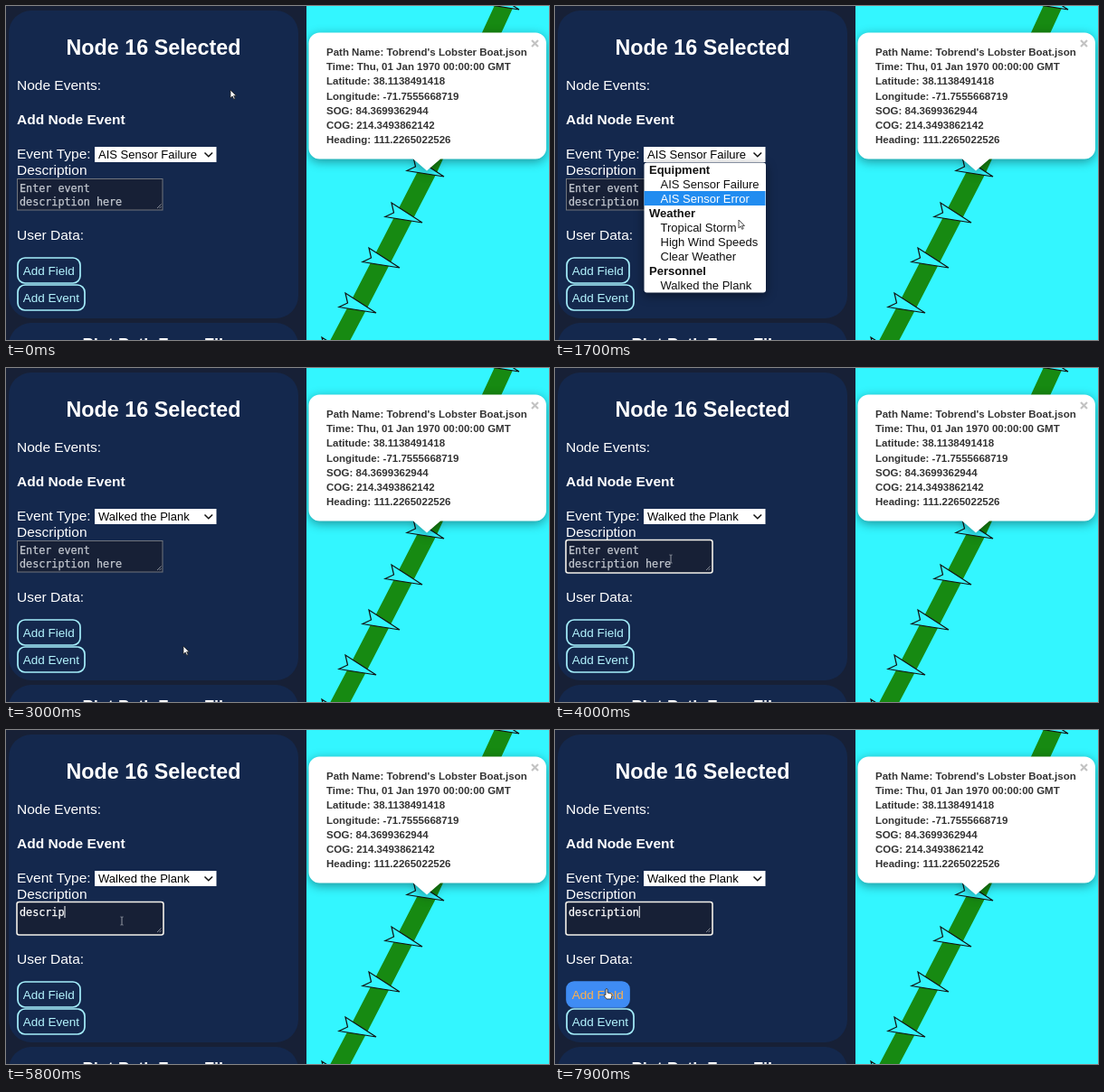
Animation, 600 px wide and 370 px high, one loop 8 s. Source, as an HTML page:

```html
<!DOCTYPE html>
<html lang="en">
<head>
<meta charset="utf-8">
<title>Add node event</title>
<style>
html, body { margin: 0; width: 100%; height: 100%; overflow: hidden; background: #172036; }
svg { display: block; width: 600px; height: 370px; font: 15.5px "Liberation Sans", Arial, sans-serif; }
text { white-space: pre; }
.h { font-weight: bold; }
.field { font-size: 13px; }
.mono { font: 11.75px "DejaVu Sans Mono", monospace; stroke-width: .25; }
.btn { font-size: 13.5px; fill: #b4f5ff; }
.btn rect { fill: none; stroke: #a5effc; stroke-width: 1.7; }
.hover, .hover text { fill: #ffb04a; }
.hover rect { fill: #3f8cf4; stroke: #3f8cf4; }
.info { font-size: 11.5px; font-weight: bold; fill: #333; }
.popup { fill: #fff; filter: drop-shadow(0 3px 6px rgba(0,0,0,.4)); }
.list { filter: drop-shadow(0 3px 6px rgba(0,0,0,.45)); }
</style>
</head>
<body>
<svg viewBox="0 0 600 370">
  <g fill="#14284d">
    <rect x="3" y="5" width="320" height="341" rx="25"/>
    <rect x="3" y="351" width="320" height="90" rx="25"/>
  </g>
  <g fill="#fff">
    <text class="h" x="163" y="54" font-size="23.3" text-anchor="middle">Node 16 Selected</text>
    <text x="12" y="93">Node Events:</text>
    <text class="h" x="12" y="131">Add Node Event</text>
    <text x="12" y="169">Event Type:</text>
    <text x="12" y="187">Description</text>
    <text x="12" y="259">User Data:</text>
    <text class="h" x="84.5" y="380.5" font-size="18.2">Plot Path From File</text>
  </g>

  <rect x="98" y="156" width="134.5" height="17" fill="#fff"/>
  <text id="choice" class="field" x="102" y="169"></text>
  <path d="M219.5 162.5l4.300 4.300 4.300-4.300" fill="none" stroke="#111" stroke-width="1.5"/>

  <rect id="area" fill="#172036"/>
  <path d="M167 224l4.500-4.500M169.500 224l2-2" stroke="#a0a4ab" stroke-width=".8"/>
  <g id="hint" class="mono" fill="#c3c8d0" stroke="#c3c8d0">
    <text x="15" y="206">Enter event</text>
    <text x="15" y="220.500">description here</text>
  </g>
  <text id="typed" class="mono" x="15" y="206" fill="#fff" stroke="#fff"></text>
  <rect id="caret" y="195" width="1" height="13" fill="#fff"/>

  <g id="addField" class="btn">
    <rect x="13" y="279" width="69" height="28" rx="8"/>
    <text x="18.800" y="297.500">Add Field</text>
  </g>
  <g class="btn">
    <rect x="13" y="309" width="74" height="28" rx="8"/>
    <text x="18.800" y="327.500">Add Event</text>
  </g>

  <g id="list" class="field">
    <rect class="list" x="98.500" y="173.500" width="134.500" height="144" rx="3" fill="#fff"/>
    <rect id="mark" x="98.500" width="134" height="16" fill="#218cf0"/>
  </g>

  <svg x="332" width="268" height="370" viewBox="332 0 268 370">
    <rect x="332" width="268" height="370" fill="#33f6ff"/>
    <path d="M554-8L466 183 391 329 360 388" fill="none" stroke="#178a12" stroke-width="19.500"/>
    <g id="boats" fill="#33f6ff" stroke="#111" stroke-width="1.2"></g>
    <path class="popup" d="M346.500 29.500h238.500a12 12 0 0 1 12 12v116a12 12 0 0 1-12 12h-105l-15 13-15-13h-103.500a12 12 0 0 1-12-12v-116a12 12 0 0 1 12-12z"/>
    <g id="info" class="info"></g>
    <path d="M581 38l7 7m0-7l-7 7" stroke="#c3c3c3" stroke-width="2.200"/>
  </svg>

  <g id="cursor">
    <path d="M0 0v9l2.200-2 1.500 3.300 1.500-.7-1.500-3.200h2.800z" fill="#fff" stroke="#222" stroke-width=".8"/>
    <path d="M-1.500-4h1l.5.500.5-.500h1M0-3.500v8M-1.500 5h1l.5-.500.5.500h1" fill="none" stroke="#a4a9b2" stroke-width=".9"/>
    <path d="M-1 0q1-1 2 0v4l4 1q1 .5 1 2l-1 4h-5l-3-4q0-1.500 2-.5z" fill="#fff" stroke="#222" stroke-width=".8"/>
  </g>
</svg>
<script>
const $ = id => document.getElementById(id);
const set = (el, attrs) => { for (const k in attrs) el.setAttribute(k, attrs[k]); };
const show = (el, on) => { el.style.display = on ? "" : "none"; };
const add = (parent, tag, attrs, text = "") => {
  const el = document.createElementNS("http://www.w3.org/2000/svg", tag);
  set(el, attrs);
  el.textContent = text;
  return parent.appendChild(el);
};

const LOOP = 8000, OPEN = 700, PICK = 2900, FOCUS = 3700, HOVER = 7300;
const TYPE_START = 5200, KEY = 100, WORD = "description", CHAR = 7.07;

for (const [x, y] of [[546, -6], [463, 179], [439, 230], [414, 280], [388, 330], [362, 379]])
  add($("boats"), "path", { d: `M${x + 21} ${y + 10}l-34-22 2.5 11-9.5 4.500z` });

["Path Name: Tobrend's Lobster Boat.json", "Time: Thu, 01 Jan 1970 00:00:00 GMT",
  "Latitude: 38.1138491418", "Longitude: -71.7555668719", "SOG: 84.3699362944",
  "COG: 214.3493862142", "Heading: 111.2265022526"]
  .forEach((line, i) => add($("info"), "text", { x: 354, y: 55 + i * 16.2 }, line));

const rows = ["Equipment", "AIS Sensor Failure", "AIS Sensor Error", "Weather", "Tropical Storm",
  "High Wind Speeds", "Clear Weather", "Personnel", "Walked the Plank"];
const isGroup = i => i === 0 || i === 3 || i === 7;
const labels = rows.map((name, i) => add($("list"), "text",
  { x: isGroup(i) ? 104 : 116.5, y: 185.7 + i * 16, class: isGroup(i) ? "h" : "" }, name));

// Pointer stops: time, x, y
const path = [[0, 248, 93], [100, 248, 93], [600, 199, 165], [1200, 199, 165], [1700, 203, 237],
  [2400, 196, 308], [3000, 196, 308], [3500, 128, 211], [6500, 128, 211], [7300, 57, 287], [8000, 57, 287]];

function pointer(t) {
  const i = Math.max(1, path.findIndex(p => p[0] >= t));
  const [t0, x0, y0] = path[i - 1], [t1, x1, y1] = path[i];
  const u = Math.max(0, (t - t0) / (t1 - t0)), e = u * u * (3 - 2 * u);
  return [x0 + (x1 - x0) * e, y0 + (y1 - y0) * e];
}

function draw(t) {
  const [x, y] = pointer(t);
  const hover = t >= HOVER, overArea = x < 174 && y > 190 && y < 228;
  set($("cursor"), { transform: `translate(${x} ${y})` });
  const shape = hover ? 2 : overArea ? 1 : 0;
  [...$("cursor").children].forEach((el, i) => show(el, i === shape));

  // The highlight trails the pointer and skips group headings
  let row = Math.max(1, Math.min(8, Math.floor((pointer(t - 100)[1] - 173) / 16)));
  if (isGroup(row)) row--;
  show($("list"), t >= OPEN && t < PICK);
  set($("mark"), { y: 173 + row * 16 });
  labels.forEach((el, i) => set(el, { fill: i === row ? "#fff" : "#111" }));
  $("choice").textContent = rows[t < PICK ? 1 : 8];

  const focused = t >= FOCUS;
  set($("area"), focused
    ? { x: 12, y: 190.5, width: 162, height: 36.5, rx: 2.5, stroke: "#f4f1ea", "stroke-width": 1.6 }
    : { x: 12.5, y: 191.5, width: 160.5, height: 34.5, rx: 0, stroke: "#70757d", "stroke-width": 1 });
  const count = Math.max(0, Math.min(WORD.length, Math.floor((t - TYPE_START) / KEY) + 1));
  show($("hint"), !count);
  $("typed").textContent = WORD.slice(0, count);
  const typing = t >= TYPE_START && t < 6500;
  show($("caret"), focused && (typing || Math.floor((t - 6500) / 500) % 2 === 0));
  set($("caret"), { x: 15 + count * CHAR });

  $("addField").classList.toggle("hover", hover);
}

const start = performance.now();
function tick() {
  draw((performance.now() - start) % LOOP);
  requestAnimationFrame(tick);
}
tick();
</script>
</body>
</html>
```
